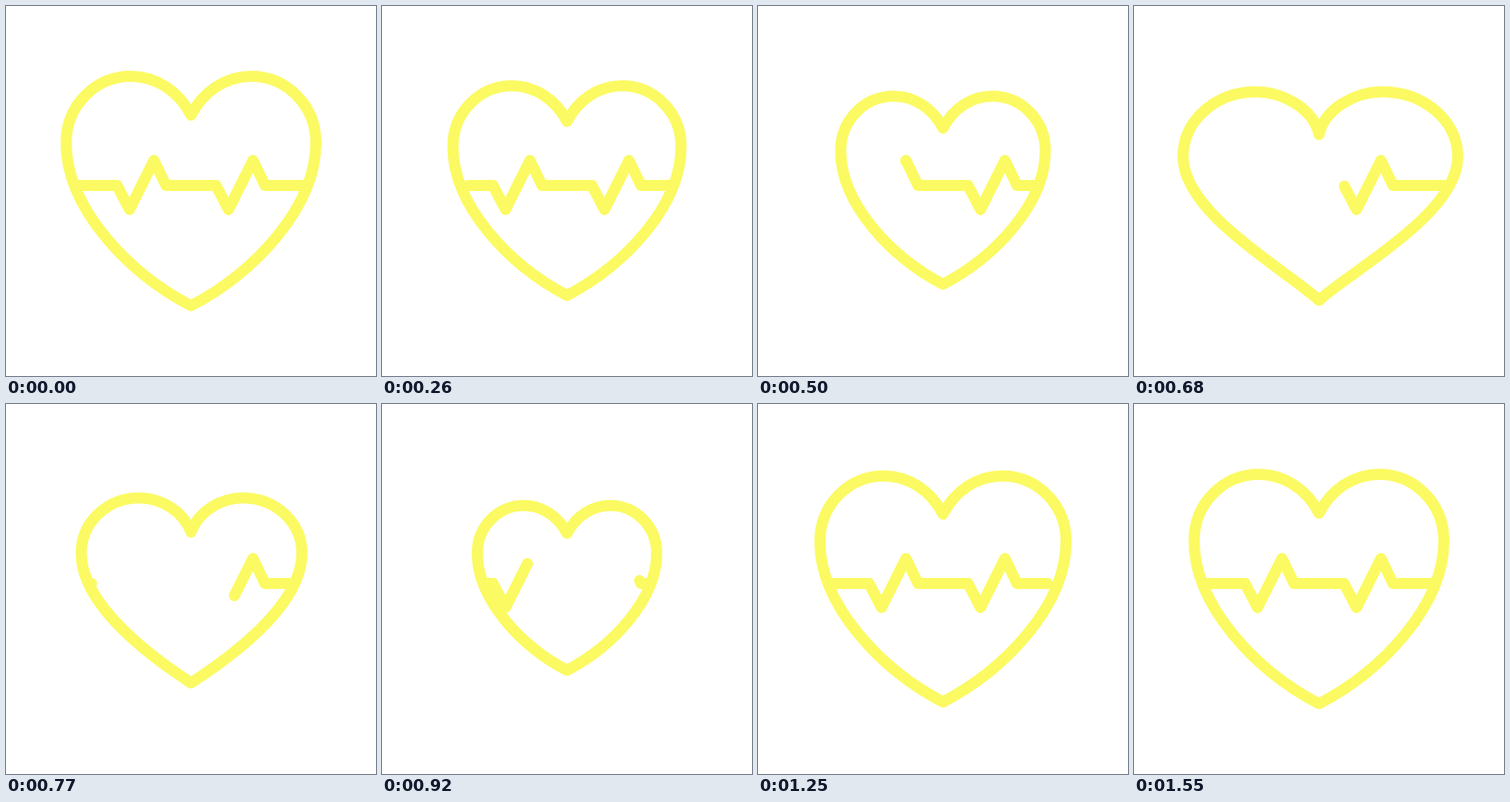
An HTML page with a canvas for the animation above (1910 ms loop, 400 by 400 pixels).

```html
<!DOCTYPE html>
<html lang="en">
<head>
<meta charset="utf-8">
<title>Heartbeat</title>
<style>
  html, body { margin: 0; width: 100%; height: 100%; overflow: hidden; background: #fff; }
  canvas { display: block; width: 400px; height: 400px; }
</style>
</head>
<body>
<canvas id="stage" width="400" height="400"></canvas>
<script>
const ctx = document.getElementById('stage').getContext('2d');
const LOOP = 1910, START = 200, STEP = 30, LAST = 45;
const CENTER_X = 200, CENTER_Y = 195.5;
const SMALL = 0.667, LARGE = 1.1;
const BASELINE = 194, PULSE_LENGTH = 401;

const mix = (a, b, u) => a + (b - a) * u;
const ramp = (k, from, to) => Math.min(1, Math.max(0, (k - from) / (to - from)));
const smooth = (k, from, to) => { const u = ramp(k, from, to); return u * u * (3 - 2 * u); };

// Two equal beats, each a dip and a peak, on a flat line.
const beat = x => `H${x}l13.5 26 26.5 -53 13 27`;
const pulsePath = new Path2D(`M65 ${BASELINE}${beat(120)}${beat(227)}H335`);

function heartScale(k) {
  if (k < 6) return mix(1, SMALL, smooth(k, 0, 6));
  if (k < 16) return mix(SMALL, LARGE, smooth(k, 6, 16));
  if (k < 23) return mix(LARGE, SMALL, smooth(k, 16, 22));
  return mix(1, SMALL, (1 - ramp(k, 23.1, LAST)) ** 4);
}

// Bezier points from notch to tip; side is 1 for the right half, -1 for the left.
function heartHalf(side, squash, scale) {
  const width = 135 + 1.4 * side * squash;
  const lobe = 65 - 3 * squash;
  const top = -119.5 + 26 * squash;
  const notch = -77.5 + 26 * squash;
  const waist = -47.5 + 18 * squash;
  const tip = 128.5 - 17 * squash;
  const taper = 0.5 - 0.28 * squash;
  const round = 0.555;
  return [
    [0, notch],
    [0.4 * taper * lobe, mix(notch, top, 0.6)], [0.57 * lobe, top], [lobe, top],
    [mix(lobe, width, round), top], [width, mix(waist, top, round)], [width, waist],
    [width, mix(waist, tip, 0.4)], [taper * width, mix(tip, waist, 0.2)], [0, tip]
  ].map(([x, y]) => [CENTER_X + side * scale * x, CENTER_Y + scale * y]);
}

function heartPath(k) {
  const scale = heartScale(k);
  const squash = smooth(k, 10, 16) - smooth(k, 16, 22);
  const [notch, ...right] = heartHalf(1, squash, scale);
  const left = heartHalf(-1, squash, scale).reverse().slice(1);
  return new Path2D(`M${notch}C${[...right, ...left].join(' ')}Z`);
}

function drawPulse(from, to) {
  if (from >= to) return;
  ctx.setLineDash([(to - from) * PULSE_LENGTH, 2 * PULSE_LENGTH]);
  ctx.lineDashOffset = -from * PULSE_LENGTH;
  ctx.stroke(pulsePath);
}

function draw(time) {
  const k = Math.min(LAST, Math.max(0, Math.floor((time % LOOP - START) / STEP)));
  const heart = heartPath(k);
  ctx.fillStyle = '#fff';
  ctx.fillRect(0, 0, 400, 400);
  ctx.strokeStyle = '#fbfa62';
  ctx.lineWidth = 12;
  ctx.lineCap = ctx.lineJoin = 'round';

  ctx.save();
  ctx.clip(heart);
  drawPulse(ramp(k, 0, 28.1), 1);
  drawPulse(0, ramp(k, 17.75, 36));
  ctx.restore();
  ctx.stroke(heart);
}

const origin = performance.now();
function tick() {
  draw(performance.now() - origin);
  requestAnimationFrame(tick);
}
tick();
</script>
</body>
</html>
```
